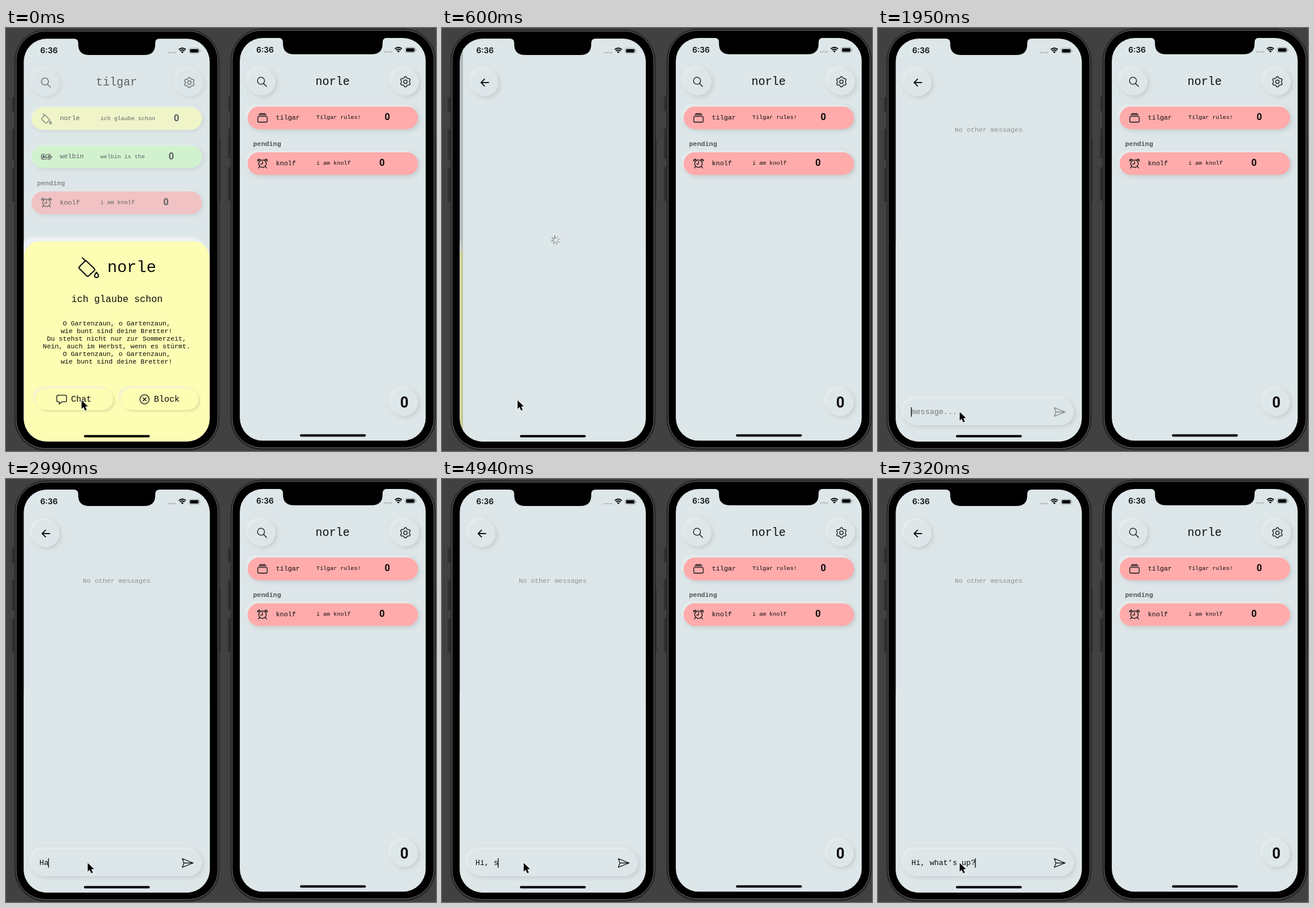
Write an HTML page that moves like this. It is 734 px wide and 721 px high and loops after 8 s.

```html
<!DOCTYPE html>
<html lang="en">
<head>
<meta charset="utf-8">
<title>Two phones chat</title>
<style>
  html, body { margin: 0; width: 100%; height: 100%; overflow: hidden; background: #414141; }
  svg { display: block; }
  text { font-family: "Liberation Mono", monospace; fill: #0c0c0c; white-space: pre; }
  .ui { font-family: Inter, "Liberation Sans", sans-serif; font-weight: 600; }
  .count { font-family: Roboto, "Liberation Sans", sans-serif; font-weight: 700; }
  .line { fill: none; stroke: #141618; stroke-width: 1.3; stroke-linecap: round; stroke-linejoin: round; }
  .raised { filter: drop-shadow(-4px -4px 1.5px #e4ecee) drop-shadow(3px 3px 3px #c6ced1); }
  .soft { filter: drop-shadow(-4px -4px 1px #f5f5cc) drop-shadow(3px 3px 1.5px #e5e5a6); }
  .sheet { filter: drop-shadow(-7px -8px 2px #eef2f3); }
  .page { filter: drop-shadow(-2px 0 4px rgba(0,0,0,.4)); }
</style>
</head>
<body>
<svg id="stage" width="734" height="721" viewBox="0 0 734 721"></svg>
<script>
const BG = '#dde6e8', YELLOW = '#fdfdb4', GREEN = '#cbfabe', PINK = '#ffabab';
const CHAR = 7.8, INPUT_X = 57;

const text = (x, y, size, str, extra = '') =>
  `<text x="${x}" y="${y}" font-size="${size}" ${extra}>${str}</text>`;
const centered = (x, y, size, str, extra = '') =>
  text(x, y, size, str, `text-anchor="middle" ${extra}`);
const rect = (x, y, w, h, r, fill, extra = '') =>
  `<rect x="${x}" y="${y}" width="${w}" height="${h}" rx="${r}" fill="${fill}" ${extra}/>`;
const at = (x, y, body, scale = 1, extra = '') =>
  `<g transform="translate(${x} ${y}) scale(${scale})" ${extra}>${body}</g>`;
const line = (d, extra = '') => `<path class="line" d="${d}" ${extra}/>`;
const round = (x, y, icon) =>
  `<circle class="raised" cx="${x}" cy="${y}" r="23.3" fill="${BG}"/>` + at(x, y, icon);

function gearPath() {
  const points = [];
  for (let i = 0; i < 24; i++) {
    const a = (i - .5) * Math.PI / 12;
    const r = i % 4 < 2 ? 8.8 : 6.9;
    points.push(`${(r * Math.sin(a)).toFixed(2)} ${(-r * Math.cos(a)).toFixed(2)}`);
  }
  return `M${points.join('L')}Z`;
}

const ring = r => `M${-r} 0a${r} ${r} 0 1 0 ${2 * r} 0a${r} ${r} 0 1 0 ${-2 * r} 0Z`;

const icons = {
  search: line('M3 3L8 8M-7.5-1.8a6 6 0 1 0 12 0a6 6 0 1 0-12 0Z'),
  gear: line(gearPath() + ring(3)),
  back: line('M6.5 0H-6M-.5-5.8L-6.3 0L-.5 5.8', 'style="stroke-width:1.9"'),
  bucket: line('M-5.5-8.3L-2.600-5.600M-1.600-5.300L5 1.200Q5.800 2 5 2.800L.2 7.300Q-.8 8.200-1.800 7.300L-8 1.200Q-8.900.3-8-.6L-3.400-5.300Q-2.500-6.200-1.600-5.300M6.900 4.300Q4.600 7 5.400 8.200Q6.900 9.600 8.400 8.200Q9.200 7 6.900 4.300Z', 'style="stroke-width:1.1"'),
  battery: line('M-2.5-4.2H-6.5Q-8.5-4.2-8.5-2.2V2.2Q-8.5 4.2-6.5 4.2H-3M2.5-4.2H5Q7-4.2 7-2.2V2.2Q7 4.2 5 4.2H2M8.7-1.2V1.2M.8-4.2L-3 .6H2L-1.5 4.2')
    + rect(-6.7, -2.5, 3.2, 5, .5, '#141618') + rect(3, -2.5, 2.5, 5, .5, '#141618'),
  alarm: line(ring(6.4) + 'M0-4V.7H-3.3M-5 5L-7 7.5M5 5L7 7.5M-8-4.5Q-9-7-6.5-7.5Q-5-7.8-4-7ZM8-4.5Q9-7 6.5-7.5Q5-7.8 4-7Z'),
  albums: line('M-6-2.5H6Q8-2.5 8-.5V5.5Q8 7.3 6 7.3H-6Q-8 7.3-8 5.5V-.5Q-8-2.5-6-2.5ZM-6.4-5H6.4M-4.7-7.2H4.7'),
  chat: line('M-6-7.2H6Q8.3-7.2 8.3-5V2Q8.3 4.2 6 4.2H.5L-4 8V4.2H-6Q-8.3 4.2-8.3 2V-5Q-8.3-7.2-6-7.2Z'),
  block: line(ring(7.8) + 'M-2.7-2.7L2.7 2.7M2.7-2.7L-2.7 2.7'),
  send: line('M-9-7.3L9.5 0L-9 7.3L-6.3 0ZM-6.3 0H9')
};

const row = (y, color, icon, name, note, countX) =>
  rect(43.5, y, 291, 38.8, 19.4, color, 'class="raised"') + at(69, y + 19.5, icons[icon]) +
  text(92, y + 22, 11.35, name) + text(161, y + 21.5, 9.75, note) +
  centered(countX, y + 23.7, 16, '0', 'class="count"');

const pending = y => text(53, y, 11.35, 'pending', 'font-weight="bold" style="fill:#4e5557"');

const header = title =>
  round(68, 93, icons.search) + round(313, 93, icons.gear) + centered(188.7, 98, 19.5, title);

const statusBar = text(58.5, 43.4, 13.3, '6:36', 'class="ui"') +
  [277.6, 281.4, 285.2, 289].map(x => `<circle cx="${x}" cy="42" r="1.3" fill="#a9b1b3"/>`).join('') +
  at(301, 43, '<path d="M0 0L-2.3-2.3Q0-4.2 2.3-2.3Z"/>' +
    line('M-4-4Q0-7 4-4M-6-6.3Q0-11 6-6.3', 'style="stroke:#000;stroke-width:1.9;stroke-linecap:butt"')) +
  rect(312.9, 34.6, 16.8, 8.4, 2.4, 'none', 'stroke="#8b9395" stroke-width=".9"') +
  rect(314.2, 35.9, 14.2, 5.8, 1.3, '#000') + rect(330.6, 37.4, 1.2, 2.9, .6, '#8b9395');

const notch = w => at(189, 18,
  `<path d="M${-w / 2 - 8}-2V0Q${-w / 2} 0 ${-w / 2} 7.500V10Q${-w / 2} 28 ${19 - w / 2} 28H${w / 2 - 19}Q${w / 2} 28 ${w / 2} 10V7.500Q${w / 2} 0 ${w / 2 + 8} 0V-2Z"/>`);

const phone = (x, y, notchWidth, content) => at(x, y,
  [[118, 25], [172, 52], [238, 58]].map(([top, h]) => rect(10, top, 6, h, 1.5, '#303030')).join('') +
  rect(362, 188, 4.5, 108, 1.5, '#303030') +
  rect(15, 3, 349, 717, 53, '#292929', 'stroke="#202020"') +
  rect(17.3, 5.3, 344.4, 711.4, 50, '#000', 'stroke="#747474" stroke-width=".9"') +
  `<g clip-path="url(#screen)">${rect(30, 18, 318, 687, 0, BG)}${content}</g>` +
  notch(notchWidth) + statusBar + rect(133, 693.8, 112.5, 4, 2, '#000'));

const verse = [
  'O Gartenzaun, o Gartenzaun,', 'wie bunt sind deine Bretter!',
  'Du stehst nicht nur zur Sommerzeit,', 'Nein, auch im Herbst, wenn es stürmt.',
  'O Gartenzaun, o Gartenzaun,', 'wie bunt sind deine Bretter!'
];

const button = (x, icon, iconX, label, labelX) =>
  rect(x, 614.5, 133, 36.5, 18.2, YELLOW, 'class="soft"') +
  at(iconX, 633, icons[icon]) + text(labelX, 636.7, 14.6, label);

const profileSheet =
  rect(30.5, 363.5, 317, 370, 27.5, YELLOW, 'class="sheet"') +
  at(141, 408, icons.bucket, 1.95) + text(173, 415.5, 27.8, 'norle') +
  centered(189.4, 467, 16.25, 'ich glaube schon') +
  verse.map((str, i) => centered(188.8, 507.3 + 13 * i, 11.35, str)).join('') +
  `<g id="actions">${button(50, 'chat', 95, 'Chat', 111)}${button(195.5, 'block', 236.5, 'Block', 252.5)}</g>`;

const spokes = Array.from({ length: 8 }, (_, i) =>
  `<path d="M0-3.600V-7.200" stroke="#737a7c" stroke-width="1.9" stroke-linecap="round" opacity="${(.95 - i * .1).toFixed(2)}" transform="rotate(${-45 * i - 60})"/>`).join('');

const chatPage = '<g id="page">' +
  rect(30.5, 10, 330, 705, 0, BG, 'class="page"') + round(68, 93, icons.back) +
  at(189, 361.5, `<g id="spinner">${spokes}</g>`) +
  '<g id="chat">' + text(131, 176.7, 11.35, 'No other messages', 'style="fill:#8d9597"') +
  rect(43, 631, 291.5, 46, 23, BG, 'class="raised"') +
  text(INPUT_X, 658, 13, '', 'id="draft"') +
  at(310, 654.5, icons.send, 1, 'id="send"') +
  '<rect id="caret" y="646.500" width="1.400" height="16" fill="#111"/></g></g>';

const leftPhone =
  '<g opacity=".6">' + header('tilgar') +
  row(135, YELLOW, 'bucket', 'norle', 'ich glaube schon', 291) +
  row(200, GREEN, 'battery', 'welbin', 'welbin is the', 282) +
  pending(268) + row(278.5, PINK, 'alarm', 'knolf', 'i am knolf', 273) + '</g>' +
  profileSheet + chatPage;

const rightPhone = header('norle') +
  row(135, PINK, 'albums', 'tilgar', 'Tilgar rules!', 282) +
  pending(202.5) + row(213, PINK, 'alarm', 'knolf', 'i am knolf', 273) +
  round(311, 639.5, centered(0, 8.8, 25, '0', 'class="count"'));

const stage = document.getElementById('stage');
stage.innerHTML =
  `<defs><clipPath id="screen">${rect(30.3, 18.3, 317.4, 686.4, 39, '#000')}</clipPath></defs>` +
  rect(0, 0, 734, 721, 0, '#414141') + phone(0, 0, 131.4, leftPhone) + phone(368.8, -1.3, 170, rightPhone) +
  '<path id="cursor" d="M0 0V14.800L3.400 11.600L6 17.600L8.700 16.400L6.200 10.600H10.800Z" fill="#000" stroke="#fff" stroke-width="1.2" paint-order="stroke"/>';

const el = id => document.getElementById(id);
const show = (id, on) => el(id).setAttribute('visibility', on ? 'inherit' : 'hidden');

// Each track holds its value until the next time stamp.
const tracks = {
  pageX: [[0, 330], [450, 51], [600, 5], [750, 0]],
  cursor: [[0, [129, 634.5]], [900, [121, 636]], [1050, [112.5, 638.5]], [1200, [114, 643]],
    [1350, [119, 650]], [1500, [127, 658]], [1650, [135, 660]], [1800, [139, 657]], [1950, [139.5, 654.5]]],
  caret: [[0, 1], [1500, .5], [1650, 0], [1800, .5], [1950, 1], [2250, .45], [2400, 0], [2690, 1]],
  send: [[0, .45], [2690, .6], [2840, .8], [2990, 1]],
  draft: [[0, ''], [2690, 'H'], [2840, 'Ha'], [3290, 'Hal'], [3440, 'Hall'], [3740, 'Hal'],
    [3890, 'Ha'], [4040, 'H'], [4340, 'Hi'], [4640, 'Hi,'], [4790, 'Hi, '], [4940, 'Hi, s'],
    [5390, 'Hi, '], [5840, 'Hi, w'], [5990, 'Hi, wh'], [6130, 'Hi, what'], [6280, 'Hi, what’'],
    [6430, 'Hi, what’s '], [6580, 'Hi, what’s u'], [6720, 'Hi, what’s up'], [7320, 'Hi, what’s up?']]
};
const value = (name, t) => tracks[name].findLast(([time]) => time <= t)[1];

function render(t) {
  show('page', t >= 450);
  el('page').setAttribute('transform', `translate(${value('pageX', t)} 0)`);
  el('actions').setAttribute('opacity', t < 450 ? 1 : .35);

  const loading = t < 900;
  show('spinner', t >= 450 && loading);
  show('chat', t >= 450 && !loading);
  el('spinner').setAttribute('transform', `rotate(${Math.floor((t - 450) / 150) * 45})`);

  const draft = value('draft', t);
  el('draft').textContent = draft || 'message...';
  el('draft').style.fill = draft ? '#0c0c0c' : '#6f7779';
  el('caret').setAttribute('x', INPUT_X - .8 + CHAR * draft.length);
  el('caret').setAttribute('opacity', value('caret', t));
  el('send').setAttribute('opacity', value('send', t));
  el('cursor').setAttribute('transform', `translate(${value('cursor', t).join(' ')})`);
}

const start = performance.now();
function tick() {
  render((performance.now() - start) % 8000);
  requestAnimationFrame(tick);
}
tick();
</script>
</body>
</html>
```
